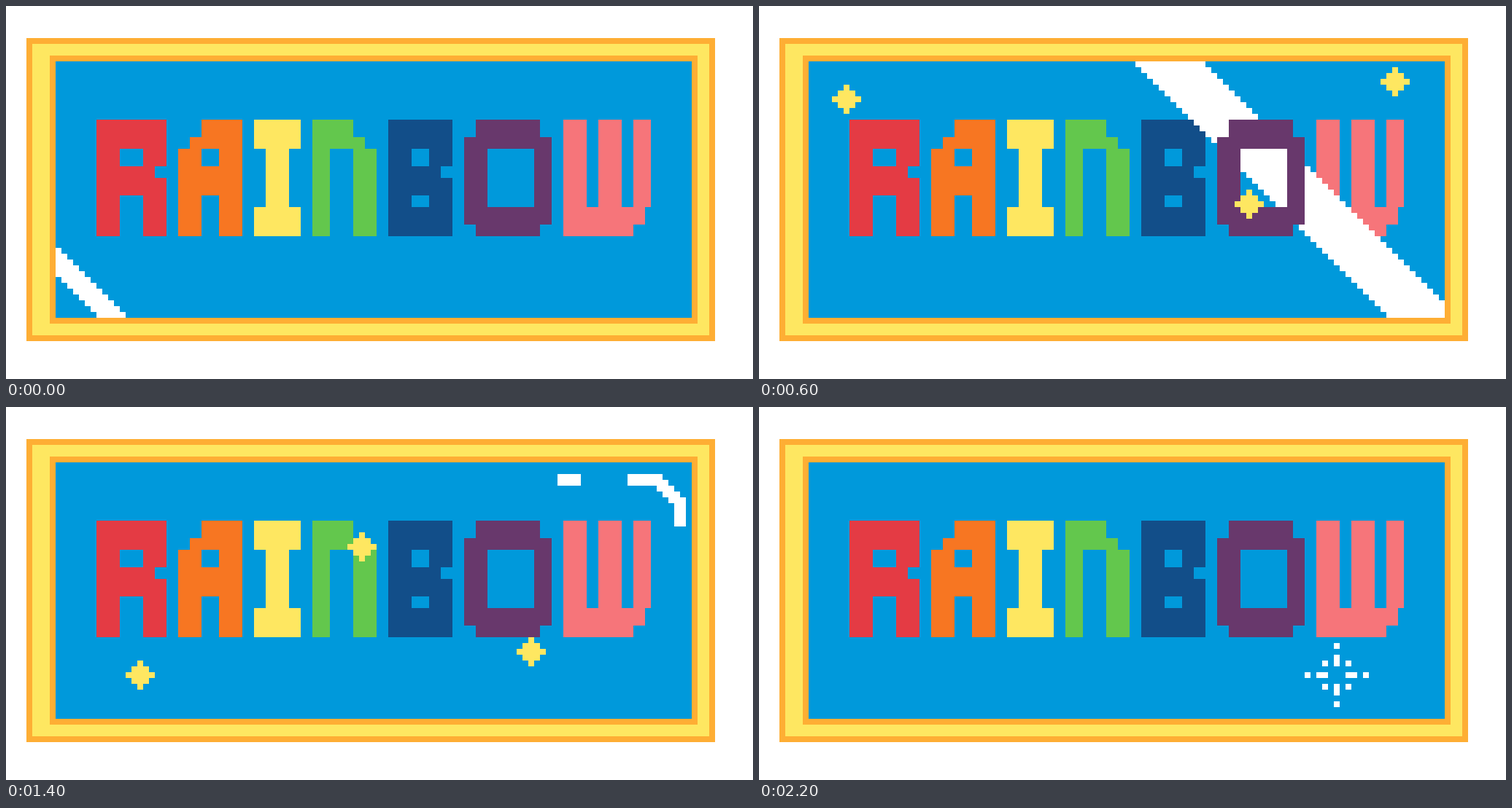
An HTML page with a canvas that plays this animation: 1024 by 512 pixels, repeating every 2400 ms.

```html
<!DOCTYPE html>
<html lang="en">
<head>
<meta charset="utf-8">
<title>Rainbow sign</title>
<style>
html, body { margin: 0; width: 100%; height: 100%; overflow: hidden; background: #fff; }
canvas { display: block; width: 1024px; height: 512px; }
</style>
</head>
<body>
<canvas width="1024" height="512"></canvas>
<script>
const ctx = document.querySelector('canvas').getContext('2d');
const STEP = 200, STEPS = 12, CELL = 8;
const WHITE = '#fff', YELLOW = '#fee761', AMBER = '#feae34', BLUE = '#0099db';
const panel = { left: 8, top: 9, right: 117, bottom: 53 };

const letter = (color, outline) => ({ color, path: new Path2D(outline) });
const letters = {
  R: letter('#e43b44', 'M15 19h12v8h-2v2h2v10h-4v-7h-4v7h-4zM19 24h4v3h-4z'),
  A: letter('#f77622', 'M33 19h7v20h-4v-7h-3v7h-4v-15h2v-2h2zM33 24h3v3h-3z'),
  I: letter(YELLOW, 'M42 19h8v5h-2v10h2v5h-8v-5h2v-10h-2z'),
  N: letter('#63c74d', 'M52 19h7v3h2v2h2v15h-4v-15h-4v15h-3z'),
  B: letter('#124e89', 'M65 19h11v8h-2v2h2v10h-11zM69 24h3v3h-3zM69 32h3v2h-3z'),
  O: letter('#68386c', 'M80 19h11v3h2v15h-2v2h-11v-2h-2v-15h2zM82 24h8v10h-8z'),
  W: letter('#f6757a', 'M95 19h4v15h2v-15h4v15h2v-15h3v15h-1v3h-2v2h-12z')
};

// One pose per step: top left corner, width and lean of the sweeping band.
const shine = [
  { left: -28, width: 5, lean: 1 },
  { left: -7, width: 8, lean: 1 },
  { left: 31, width: 8.4, lean: 0.8 },
  { left: 64, width: 12, lean: 1 },
  { left: 97, width: 12, lean: 1 }
];

// A new group flares up on every odd step and shrinks on the next one.
const starGroups = [
  [[76, 14], [27, 46], [107, 46]],
  [[14, 15], [108, 12], [83, 33]],
  [[18, 34], [50, 15], [67, 42], [106, 32]],
  [[60, 23], [22, 45], [89, 41]],
  [[24, 15], [111, 12], [91, 47]]
];
const burst = [98, 45];

function box(color, x, y, w, h) {
  ctx.fillStyle = color;
  ctx.fillRect(x, y, w, h);
}

function drawSign() {
  box(AMBER, 3, 5, 118, 52);
  box(YELLOW, 4, 6, 116, 50);
  box(AMBER, 7, 8, 111, 46);
  box(BLUE, panel.left, panel.top, panel.right - panel.left, panel.bottom - panel.top);
}

function drawLetters(names) {
  for (const name of names) {
    ctx.fillStyle = letters[name].color;
    ctx.fill(letters[name].path, 'evenodd');
  }
}

function drawShine({ left, width, lean }) {
  for (let y = panel.top; y < panel.bottom; y++) {
    const x = left + lean * (y - panel.top);
    const from = Math.max(panel.left, Math.round(x));
    const to = Math.min(panel.right, Math.round(x + width));
    if (to > from) box(WHITE, from, y, to - from, 1);
  }
}

function drawStar(color, [x, y], reach) {
  box(color, x - reach, y, 2 * reach + 1, 1);
  box(color, x, y - reach, 1, 2 * reach + 1);
  if (reach > 1) box(color, x - 1, y - 1, 3, 3);
}

function drawStars(step) {
  const group = starGroups[Math.floor((step - 1) / 2)] ?? [];
  for (const star of group) drawStar(YELLOW, star, step % 2 ? 2 : 1);
}

// Runs along the top, down the right side and back along the bottom.
function drawTrack(from, to) {
  for (let s = Math.round(from); s <= Math.round(to); s++) {
    const x = Math.min(s, 114, 260 - s);
    const y = Math.min(Math.max(s - 99, 11), 50);
    box(WHITE, x, y, 2, 2);
  }
}

// The dashes stretch, as their ends travel at different speeds.
function drawGlint(step) {
  const t = step - 7;
  drawTrack(94 + 20.5 * t, 96 + 21.5 * t);
  drawTrack(106 + 19 * t, 117 + 21 * t);
}

function drawBurst([x, y]) {
  for (const side of [-1, 1]) {
    for (const d of [2, 3, 5]) {
      box(WHITE, x + side * d, y, 1, 1);
      box(WHITE, x, y + side * d, 1, 1);
    }
    for (const dy of [-2, 2]) box(WHITE, x + side * 2, y + dy, 1, 1);
  }
}

function draw(step) {
  ctx.setTransform(1, 0, 0, 1, 0, 0);
  box(WHITE, 0, 0, 1024, 512);
  ctx.setTransform(CELL, 0, 0, CELL, CELL / 2, CELL / 2);
  drawSign();

  // The band starts behind the word and ends in front of B and W.
  const covered = step > 2 ? 'BW' : '';
  drawLetters(covered);
  if (shine[step]) drawShine(shine[step]);
  drawLetters(Object.keys(letters).filter(name => !covered.includes(name)));

  drawStars(step);
  if (step >= 6 && step <= 9) drawGlint(step);
  if (step === 10) drawStar(WHITE, burst, 2);
  if (step === 11) drawBurst(burst);
}

let shown = -1;
const start = performance.now();
function tick(now) {
  const step = Math.floor(Math.max(0, now - start) / STEP) % STEPS;
  if (step !== shown) draw(shown = step);
  requestAnimationFrame(tick);
}
tick(start);
</script>
</body>
</html>
```
